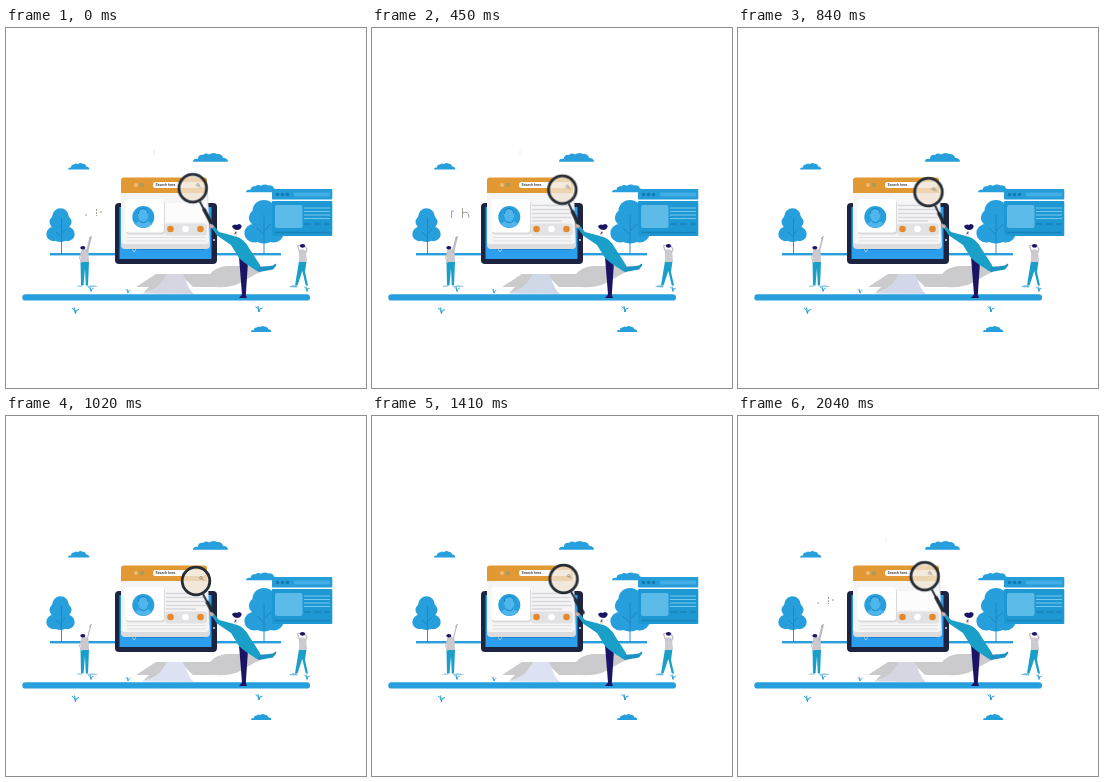
Write an HTML page without scripts that moves like this. It is 360 by 360 pixels and loops after 2070 ms.

```html
<!DOCTYPE html>
<html lang="en">
<head>
<meta charset="utf-8">
<title>Search illustration</title>
<style>
html, body { margin: 0; width: 100%; height: 100%; overflow: hidden; background: #fff; }
svg { display: block; width: 100vw; height: 100vh; }
text { font: 600 3.4px Inter, Arial, sans-serif; fill: #333; }
.blue { fill: #269fdc; }
.teal { fill: #1a9fc9; }
.navy { fill: #1b1464; }
.lens { animation: lens 2070ms linear infinite; }
.stick { animation: stick 2070ms linear infinite; }
.cover { animation: cover 2070ms linear infinite; transform-origin: 159px 0; }
.ticks { animation: ticks 2070ms step-end infinite; }
.marks { animation: marks 2070ms step-end infinite; }
.pole { animation: pole 2070ms step-end infinite; transform-origin: 148px 125px; }
.sleeve { animation: sleeve 2070ms linear infinite; }
.stand { animation: stand 2070ms linear infinite; }
@keyframes lens {
  0%, 98.5%, 100% { transform: translate(186.7px, 160.2px); }
  11.6% { transform: translate(189.5px, 160.2px); }
  30.4% { transform: translate(191px, 163px); }
  49.3% { transform: translate(190px, 165px); }
  68.1% { transform: translate(191.6px, 163px); }
  82.6% { transform: translate(190px, 161.2px); }
}
@keyframes stick {
  0%, 100% { transform: rotate(62deg); }
  11.6% { transform: rotate(64deg); }
  30.4% { transform: rotate(66deg); }
  49.3% { transform: rotate(62deg); }
  68.1% { transform: rotate(60deg); }
  82.6% { transform: rotate(62deg); }
}
@keyframes cover {
  0%, 97%, 100% { transform: scaleX(1); }
  11.6% { transform: scaleX(.4); }
  20%, 88% { transform: scaleX(0); }
}
@keyframes ticks { 0% { opacity: 1; } 9.5% { opacity: 0; } 79.7% { opacity: 1; } }
@keyframes marks { 0% { opacity: 0; } 9.5% { opacity: 1; } 39% { opacity: 0; } }
@keyframes pole {
  0% { transform: scaleY(.55); opacity: .55; }
  24% { transform: scaleY(1); opacity: 1; }
  39% { opacity: 0; }
  79.7% { transform: scaleY(.4); opacity: .55; }
}
@keyframes sleeve {
  0%, 35%, 80%, 100% { stroke-width: 2.3px; }
  46%, 70% { stroke-width: 1.1px; }
}
@keyframes stand {
  0%, 82%, 100% { fill: #d5d6e2; }
  12% { fill: #dce7f1; }
  30% { fill: #c5cbdc; }
  49%, 68% { fill: #dde2f2; }
}
</style>
</head>
<body>
<svg viewBox="0 0 360 360">
  <defs>
    <path id="cloud" d="M0 9Q0 5 5 6Q5 1 10 1.500Q13-1 16 1Q20-2 24 .5Q29 0 30 4.500Q35 5 35 9Z"/>
    <path id="grass" d="M-3.500-2.500Q0-1 0 3Q0-1 3.500-1M-1-3L0 3" fill="none" stroke="#269fdc" stroke-width="1"/>
    <g id="tree">
      <circle cx="0" cy="-13.500" r="8.300"/>
      <circle cx="-4.500" cy="-8" r="6.500"/><circle cx="4.500" cy="-8" r="6.500"/>
      <circle cx="-7" cy="4" r="7.200"/><circle cx="7" cy="4" r="7.200"/>
      <ellipse cx="0" cy="4" rx="9" ry="8"/>
    </g>
  </defs>

  <g class="blue">
    <use href="#cloud" transform="translate(62 135.500) scale(.61 .67)"/>
    <use href="#cloud" transform="translate(187 125.500) scale(1 .92)"/>
    <use href="#cloud" transform="translate(240 157) scale(.93 .8)"/>
    <use href="#cloud" transform="translate(245 298.500) scale(.58 .62)"/>
    <use href="#tree" x="54.500" y="202"/>
    <use href="#tree" transform="translate(258 200) scale(1.380 1.290)"/>
    <rect x="44" y="225" width="231" height="2.400"/>
  </g>
  <path d="M55.500 226V190M55.500 209L50 204M55.500 206L60 201M258 226V187M258 207L251 200M258 203L265 196" fill="none" stroke="#1b86c0" stroke-width=".9"/>

  <!-- floor shadow and stand -->
  <path d="M130 259L150 246H204Q210 239 220 238H260Q258 243 250 246L234 255Q226 260 208 259H187L178 250L160 250Q152 262 137 265L143 259Z" fill="#cbcbcd"/>
  <path class="stand" d="M136 265.500Q152 262 157 252L161 246H177L180 253Q183 262 188 266Z"/>
  <rect class="blue" x="16.300" y="266.200" width="287.700" height="6.400" rx="3.200"/>
  <use href="#grass" x="69.500" y="282.500"/>
  <use href="#grass" x="253" y="281"/>
  <use href="#grass" transform="translate(122 263) scale(.7)"/>
  <use href="#grass" transform="translate(85 261) scale(.8)"/>
  <use href="#grass" transform="translate(301 261) scale(.8)"/>

  <!-- monitor -->
  <rect x="109" y="175" width="102" height="61" rx="4" fill="#1c2442"/>
  <rect x="113.500" y="179" width="92" height="52" fill="#2b9fee"/>
  <circle cx="208" cy="212" r="1" fill="#dde"/>
  <path d="M117 218H203L198 222H125Z" fill="#1d7fc9"/>
  <path d="M126 221l2 3 2-3" fill="none" stroke="#b9def5" stroke-width=".8"/>

  <!-- browser card -->
  <path d="M115 164H202L204 217Q204 221 200 221H119Q115 221 115 217Z" fill="#dcdcdf"/>
  <path d="M115 164H201L203 213Q203 216 199 216H119Q115 216 115 213Z" fill="#f5f5f6"/>
  <path d="M115 165V152Q115 149.500 118 149.500H198Q201 149.500 201 152V165Z" fill="#e39933"/>
  <circle cx="130" cy="157" r="2" fill="#eebb79"/>
  <circle cx="136" cy="157" r="2.300" fill="#a99b5b"/>
  <rect x="147" y="154" width="52" height="6" rx="2.500" fill="#fff"/>
  <text x="149.500" y="158.300">Search here..</text>
  <path d="M160 177.500H197M160 181.500H199M160 185.500H199M160 189.500H200M160 193H190" stroke="#d8d8dc" stroke-width="1.500"/>
  <rect class="cover" x="159" y="175" width="41" height="19" fill="#fcfcfc"/>
  <rect x="120" y="172.500" width="39" height="34" rx="3" fill="#d9d9dd"/>
  <rect x="119.500" y="171" width="38.500" height="33.500" rx="3" fill="#fff"/>
  <rect x="159" y="195.500" width="42" height="12" rx="3" fill="#e2e2e5"/>
  <path d="M121 209.500H200M121 213H200" stroke="#e1e1e4" stroke-width="1"/>
  <circle cx="164.500" cy="201" r="3.300" fill="#e5892c"/>
  <circle cx="179.500" cy="201" r="3.300" fill="#fff"/>
  <circle cx="194.500" cy="201" r="3.300" fill="#e5892c"/>
  <circle class="blue" cx="137.300" cy="189" r="11"/>
  <path d="M129 196.500Q130 194 134.500 193Q131 188 132 184Q137 178 142.500 184Q143 189 140 193Q145 194 146 196.500Q137 203 129 196.500Z" fill="#4fb5ea"/>
  <path d="M132.500 186Q132 181 137 180.500Q142 181 142 186M134 193.500Q137 196 141 193.500" fill="none" stroke="#1684c3" stroke-width="1"/>

  <!-- side panel -->
  <rect x="266" y="161" width="60.300" height="10.500" rx="1" fill="#259dd9"/>
  <rect x="266" y="173" width="60.300" height="35" rx="1" fill="#1e98d3"/>
  <rect x="288" y="164.500" width="36" height="4" rx="1" fill="#42aee3"/>
  <g fill="#1477ae">
    <circle cx="271.500" cy="166.500" r="1.700"/><circle cx="276.500" cy="166.500" r="1.700"/><circle cx="281.500" cy="166.500" r="1.700"/>
  </g>
  <rect x="269" y="177" width="27.500" height="23" rx="2" fill="#5dbbe9"/>
  <path d="M298 180H324M298 183.500H324M298 187H324M298 190.500H324" stroke="#76c8ee" stroke-width="1.200"/>
  <path d="M298 196H305M308 196H315M318 196H324M269 204.500H324" stroke="#1883bb" stroke-width="1.600"/>

  <!-- left figure -->
  <path class="teal" d="M74.500 233.500H83L82.500 246L82 257.500H79.800L79 240L77.500 257.500H75Z"/>
  <path d="M70 258.500Q73 256.500 77 258.500ZM80 258.800Q86 256 92.500 258.800Z" fill="#6bb9e2"/>
  <path d="M75 222Q79 219 82.500 223L83 234H74.500Z" fill="#c9c9ce"/>
  <path class="sleeve" d="M81 224L84.500 210" stroke="#bcbcc4" stroke-width="2.300" stroke-linecap="round"/>
  <path d="M75.500 224L73.500 230L76 235" fill="none" stroke="#c8b8b8" stroke-width="1"/>
  <path d="M83.500 211L85.500 208" stroke="#9b9bac" stroke-width="1"/>
  <ellipse class="navy" cx="76.800" cy="219.800" rx="2.500" ry="1.800"/>

  <!-- right figure -->
  <path class="teal" d="M293 233H300.500L299 244L302 257.500H299.800L296.300 243L291.500 257.500H289Z"/>
  <path d="M283 259Q286 256 291.500 258L291 259.500ZM299.500 258L303 261.500L301 261Z" fill="#6bb9e2"/>
  <path d="M293 222.500Q297 220 300 223L301 234H293Z" fill="#cbcbd0"/>
  <path d="M294 225L291.500 218L295 217M299.500 225L301 221L298 217" fill="none" stroke="#c9bcc0" stroke-width="1.300"/>
  <ellipse class="navy" cx="296.500" cy="217.800" rx="2.600" ry="1.900"/>

  <!-- stray strokes -->
  <g fill="none" stroke="#8d8478" stroke-width=".8">
    <path class="ticks" d="M80 186V189M90.500 181V188M95 183V186" stroke-dasharray="2 1"/>
    <path class="marks" d="M82 183H79.500V190M90.500 180V190M90.500 185Q97 182 97 190"/>
    <path class="pole" d="M148 120V128" stroke="#bbb"/>
  </g>

  <!-- magnifier -->
  <g class="lens">
    <g class="stick">
      <path d="M15 0H26" stroke="#39424c" stroke-width="2.200"/>
      <path d="M24 0H39" stroke="#1d2731" stroke-width="3.400" stroke-linecap="round"/>
    </g>
    <circle r="13.800" fill="#f0e4d3" fill-opacity=".78" stroke="#252c34" stroke-width="2.800"/>
    <path d="M5-4.500a1.300 1.300 0 1 0 .1 0M6-2.500l2 2" fill="none" stroke="#666" stroke-width=".6"/>
  </g>

  <!-- woman -->
  <path class="navy" d="M233 229L242 234L239.800 267L241 270H233L236 266.500Z"/>
  <path d="M240 228L247 231L255 239L267 237.500L269.500 235.500L270.500 237L267 241.500L253 244Q244 240 240 228Z" fill="#1c91c4"/>
  <path class="teal" d="M204.500 198L206.500 196L213 204L230 208.500Q238 210.500 243 220L254 237L252 243Q240 237 233 230L225 217L211 207.500Z"/>
  <path d="M204 195.500L208 198L206.500 200.500L203.500 199Z" fill="#d9a7a0"/>
  <path d="M228 203L231 202.500L231 208L228.500 208.500Z" fill="#f0e2e0"/>
  <path class="navy" d="M226 198Q228.500 195.500 231 197Q233.500 194.500 235.800 198Q235 201.500 232 202Q227 202 226 198ZM228 206.500L230 203.500L230.500 205Z"/>
</svg>
</body>
</html>
```
